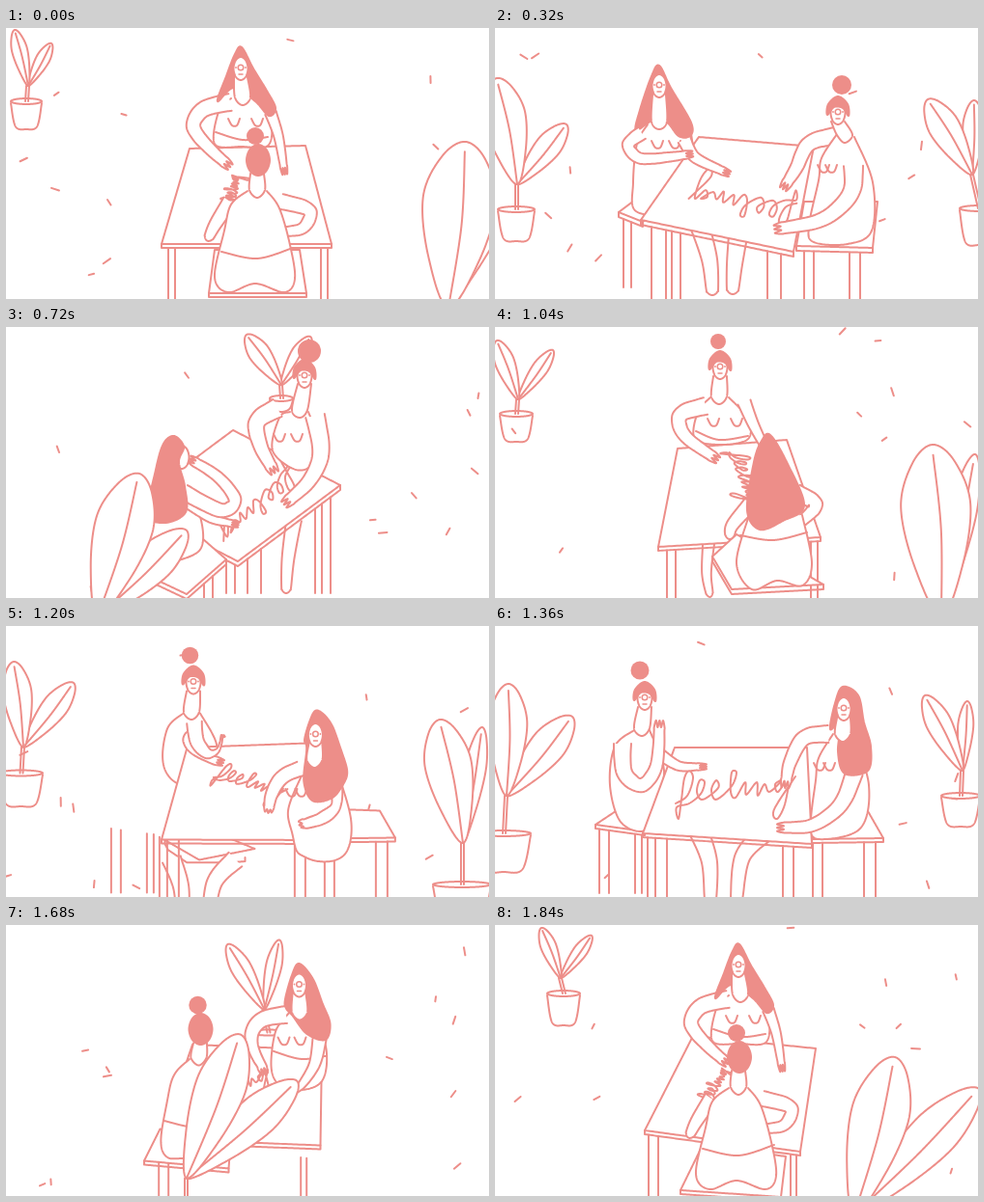
Recreate the animation shown at these times as an HTML page with a canvas. Size 500 px wide and 281 px high, loop 1920 ms.

```html
<!DOCTYPE html>
<html lang="en">
<head>
<meta charset="utf-8">
<title>Feeling</title>
<style>
html, body { margin: 0; width: 100%; height: 100%; overflow: hidden; background: #fff; }
canvas { display: block; width: 500px; height: 281px; }
</style>
</head>
<body>
<canvas id="stage"></canvas>
<script>
const INK = '#ed8e89', STEP = 80, COUNT = 24, SAMPLES = 240, FLOOR = 284;
const lerp = (a, b, u) => a + (b - a) * u;
const poses = [];
let strokes, ox = 0, oy = 0;

// Even samples along a flat list of points
function trace(nums, count, loop, straight) {
  const n = nums.length / 2, spans = loop ? n : n - 1, out = [];
  const at = (i, c) => nums[(loop ? (i + n) % n : Math.min(Math.max(i, 0), n - 1)) * 2 + c];
  for (let k = 0; k <= count; k++) {
    const s = k / count * spans, i = Math.min(Math.floor(s + 1e-9), spans - 1), u = s - i;
    for (const c of [0, 1]) {
      const p = at(i, c), q = at(i + 1, c);
      const m = (q - at(i - 1, c)) / 2, r = (at(i + 2, c) - p) / 2;
      out.push(straight ? lerp(p, q, u)
        : p + u * (m + u * (3 * (q - p) - 2 * m - r + u * (2 * (p - q) + m + r))));
    }
  }
  return out;
}

// Kinds: s curve, w white curve, z white closed curve, f filled closed curve,
// l line, k white polygon, c disc, e face features, d separate segments
function add(name, kind, ...nums) {
  const moved = nums.map((v, i) => i > 1 && kind === 'c' ? v : v + (i % 2 ? oy : ox));
  const path = 'ced'.includes(kind) ? moved
    : trace(moved, SAMPLES, 'zfk'.includes(kind), 'lk'.includes(kind));
  strokes.set(name, { kind, path });
}

function shift(x = 0, y = 0) { ox = x; oy = y; }

function oval(name, kind, x, y, rx, ry) {
  const d = 0.7;
  add(name, kind, x, y - ry, x + rx * d, y - ry * d, x + rx, y, x + rx * d, y + ry * d,
    x, y + ry, x - rx * d, y + ry * d, x - rx, y, x - rx * d, y - ry * d);
}

function leaf(name, x, y, tx, ty, w) {
  const dx = tx - x, dy = ty - y, len = Math.hypot(dx, dy);
  const spot = (t, side) => [x + dx * t - dy / len * w * side, y + dy * t + dx / len * w * side];
  add(name, 'z', x, y, ...spot(.3, .7), ...spot(.65, 1), ...spot(.9, .6), tx, ty,
    ...spot(.9, -.6), ...spot(.65, -1), ...spot(.3, -.7));
  add(name + 'v', 's', ...spot(.94, 0), ...spot(.5, .12), x, y);
}

function plant(name, x, y, a, b, pot = [x, y + 60, 40, 50]) {
  const [px, py, w, h] = pot, q = w * .7;
  add(name + 'Pot', 's', px - w, py + 2, px - q, py + h - 3, px, py + h, px + q, py + h - 3, px + w, py + 2);
  oval(name + 'Rim', 'z', px, py, w, 3);
  add(name + 'Stem', 'd', x - 2, y, px - 1, py, x + 1, y, px + 2, py);
  leaf(name + 'B', x, y, ...b);
  leaf(name + 'A', x, y, ...a);
}

// Tapered arm or leg around a centre line
function limb(name, w, nums, hand = true) {
  const mid = trace(nums, 8), left = [], right = [], tip = [];
  let nx, ny;
  for (let i = 0; i <= 8; i++) {
    const a = Math.max(i - 1, 0) * 2, b = Math.min(i + 1, 8) * 2;
    const dx = mid[b] - mid[a], dy = mid[b + 1] - mid[a + 1], len = Math.hypot(dx, dy);
    const r = w * (1 - i * .05);
    nx = -dy / len; ny = dx / len;
    left.push(mid[i * 2] + nx * r, mid[i * 2 + 1] + ny * r);
    right.unshift(mid[i * 2] - nx * r, mid[i * 2 + 1] - ny * r);
  }
  for (let k = 0; k < 7; k++) {
    const side = 1 - k / 3, r = w * .6 * side;
    const out = hand ? (k % 2 ? 11 : 4) : 4 * (1 - side * side);
    tip.push(mid[16] + nx * r + ny * out, mid[17] + ny * r - nx * out);
  }
  add(name, 'w', ...left, ...tip, ...right);
}

function table(name, top, thick, xs = [], end = FLOOR, corner = false) {
  const front = top.slice(2, corner ? 8 : 6), n = front.length, legs = [];
  const edgeY = x => {
    const i = n > 4 && x > front[2] ? 2 : 0;
    return lerp(front[i + 1], front[i + 3], (x - front[i]) / (front[i + 2] - front[i]));
  };
  for (const x of xs) legs.push(x, edgeY(x) + thick, x, end);
  if (xs.length) add(name + 'Legs', 'd', ...legs);
  const low = front.map((v, i) => v + (i % 2 ? thick : 0));
  add(name + 'Edge', 'l', front[0], front[1], ...low, front[n - 2], front[n - 1]);
  add(name + 'Top', 'k', ...top);
}

function face(name, x, y, look = true) {
  oval(name + 'Face', 'z', x, y, 7.5, 12);
  if (look) add(name + 'Eyes', 'e', x, y - 1);
}

function neck(name, x, y, bx, by) {
  add(name + 'Neck', 'w', x - 7, y + 9, bx - 8, by, bx, by + 8, bx + 8, by, x + 7, y + 9);
}

function bust(name, x, y, gap) {
  for (const side of [-1, 1]) {
    const c = x + side * gap;
    add(name + 'Bust' + side, 's', c - 6, y - 5, c - 2, y + 2, c + 3, y + 2, c + 6, y - 5);
  }
}

function cap(x, y, bx, by, r) {
  face('b', x, y);
  add('bCap', 'f', x - 11, y + 2, x - 10, y - 9, x, y - 17, x + 10, y - 9, x + 11, y + 3, x + 5, y - 5, x - 4, y - 6);
  add('bBun', 'c', bx, by, r);
}

const body = (name, ...nums) => add(name + 'Body', 'w', ...nums);
const hair = (...nums) => add('aHair', 'f', ...nums);

const letters = [0, 4, 12, -4, 18, -22, 14, -30, 9, -22, 6, 0, 3, 20, 1, 8, 14, 4, 26, -6, 30, -18, 25, -20,
  22, -8, 28, 0, 44, -12, 42, -20, 37, -10, 42, 0, 58, -14, 63, -28, 58, -28, 57, -8, 62, -2, 72, -18,
  73, -5, 84, -18, 85, -4, 92, -16, 97, -8, 110, -20, 103, -16, 106, -8, 117, -22, 113, 5, 105, 20, 102, 10, 124, -24];

// Lettering set along one axis, with its height along another
function word(x, y, ax, ay, bx, by) {
  const out = [];
  for (let i = 0; i < letters.length; i += 2) {
    const u = letters[i], v = letters[i + 1];
    out.push(x + u * ax + v * bx, y + u * ay + v * by);
  }
  add('word', 's', ...out);
}

function facing(x, y) {
  shift(x, y);
  body('a', 233, 73, 221, 84, 216, 120, 244, 123, 272, 121, 273, 90, 255, 72);
  add('aHem', 's', 217, 108, 245, 116, 271, 113);
  bust('a', 248, 99, 12);
  limb('aL', 9, [232, 77, 205, 84, 194, 102, 208, 122, 224, 137]);
  limb('aR', 6, [274, 88, 282, 112, 287, 141]);
  hair(244, 20, 256, 42, 270, 65, 279, 83, 272, 91, 258, 76, 236, 62, 219, 76, 228, 50, 237, 27);
  neck('a', 243, 42, 245, 72);
  face('a', 243, 42);
  shift();
}

function seated(x, y) {
  shift(x, y);
  limb('bL', 8, [232, 180, 217, 203, 210, 217], false);
  limb('bR', 8, [285, 180, 314, 189, 308, 207, 290, 211], false);
  body('b', 250, 169, 233, 183, 226, 210, 216, 258, 230, 274, 258, 265, 288, 274, 299, 260, 294, 225, 283, 187, 270, 169);
  add('bHem', 's', 223, 232, 260, 239, 297, 228);
  neck('b', 260, 142, 260, 168);
  oval('bHead', 'f', 261, 137, 12, 16);
  add('bBun', 'c', 258, 112, 9);
  shift();
}

function leaning(x, y) {
  shift(x, y);
  body('a', 350, 112, 335, 137, 332, 160, 327, 205, 335, 221, 378, 210, 387, 165, 370, 112);
  bust('a', 341, 147, 5);
  limb('aL', 9, [345, 112, 320, 116, 306, 140, 302, 157]);
  limb('aR', 9, [372, 152, 358, 185, 330, 206, 303, 209]);
  hair(360, 63, 376, 72, 382, 100, 389, 125, 386, 150, 362, 153, 355, 130, 358, 100, 347, 107, 352, 80);
  neck('a', 361, 86, 360, 112);
  face('a', 361, 86);
  shift();
}

function pose(at, build) {
  strokes = new Map();
  build();
  poses.push({ at, strokes });
}

pose(0, () => {
  plant('p', 23, 60, [9, 2, 8], [47, 16, 7], [21, 76, 16, 29]);
  plant('q', 458, 290, [476, 118, 38], [525, 150, 14]);
  table('t', [190, 125, 161, 224, 337, 224, 310, 122], 4, [168, 175, 326, 333]);
  facing(0, 0);
  word(236, 180, .08, -.22, .5, 0);
  table('s', [216, 230, 210, 275, 311, 275, 304, 230], 4);
  seated(0, 0);
});

pose(4, () => {
  plant('p', 23, 162, [2, 52, 22], [74, 100, 13], [22, 188, 19, 33]);
  plant('q', 494, 152, [448, 74, 16], [496, 75, 11], [501, 187, 20, 38]);
  table('s', [144, 179, 128, 191, 153, 201, 170, 185], 5, [133, 141], 269);
  table('u', [320, 180, 312, 226, 391, 228, 396, 180], 5, [320, 330, 367, 378]);
  body('a', 158, 100, 147, 120, 143, 160, 146, 190, 185, 190, 205, 150, 203, 108);
  limb('bFoot', 10, [212, 205, 222, 240, 225, 273], false);
  limb('bToe', 10, [252, 212, 248, 245, 246, 272], false);
  table('t', [211, 113, 151, 199, 309, 232, 330, 123], 5, [162, 177, 183, 192, 282, 296]);
  word(312, 185, -.88, -.22, .1, -.8);
  bust('a', 177, 122, 9);
  hair(170, 39, 182, 62, 203, 98, 202, 112, 190, 112, 178, 98, 163, 96, 146, 106, 150, 85, 162, 50);
  limb('aR', 7, [196, 116, 207, 134, 233, 147]);
  limb('aL', 7, [152, 109, 138, 121, 150, 135, 178, 134, 194, 132]);
  neck('a', 170, 60, 170, 97);
  face('a', 170, 60);
  limb('bL', 9, [352, 112, 325, 120, 312, 145, 304, 158]);
  body('b', 354, 110, 338, 135, 335, 158, 325, 205, 330, 222, 365, 224, 390, 210, 391, 160, 372, 113);
  bust('b', 344, 147, 4);
  limb('bR', 10, [371, 143, 368, 172, 340, 198, 300, 207]);
  neck('b', 355, 88, 362, 111);
  cap(355, 88, 359, 59, 10);
});

pose(9, () => {
  plant('q', 285, 60, [249, 8, 11], [315, 10, 9], [285, 74, 12, 14]);
  limb('bFoot', 8, [298, 200, 292, 240, 290, 272], false);
  table('t', [235, 107, 129, 186, 240, 243, 346, 164], 5, [228, 237, 250, 264, 320, 327, 336], 276, true);
  word(295, 148, -.64, .5, -.4, -.5);
  body('b', 294, 88, 283, 94, 276, 128, 300, 148, 318, 140, 318, 105, 313, 88);
  bust('b', 292, 116, 9);
  limb('bL', 10, [281, 84, 260, 98, 263, 122, 273, 142]);
  limb('bR', 10, [320, 92, 326, 130, 315, 158, 296, 177]);
  neck('b', 309, 50, 304, 86);
  cap(309, 51, 314, 25, 12);
  table('s', [187, 205, 130, 250, 187, 277, 228, 241], 5, [205, 214], FLOOR, true);
  body('a', 150, 195, 143, 215, 145, 245, 200, 232, 198, 187, 180, 180);
  limb('aR', 6, [188, 182, 212, 198, 230, 203]);
  limb('aL', 8, [184, 171, 222, 190, 237, 179, 220, 156, 199, 142]);
  face('a', 182, 135, false);
  hair(174, 113, 184, 124, 179, 140, 185, 165, 186, 192, 165, 203, 147, 194, 155, 148, 163, 121);
  plant('p', 95, 300, [138, 152, 30], [187, 211, 20]);
});

pose(13, () => {
  plant('q', 24, 75, [2, 14, 10], [60, 24, 8], [22, 90, 17, 29]);
  plant('p', 462, 300, [453, 122, 36], [497, 132, 14]);
  limb('bFoot', 6, [221, 225, 219, 255, 222, 276], false);
  table('t', [189, 126, 169, 228, 337, 218, 302, 117], 4, [178, 187, 327, 334]);
  word(245, 130, .1, .42, -.6, 0);
  body('b', 223, 73, 210, 88, 207, 116, 235, 122, 262, 116, 262, 95, 242, 73);
  add('bHem', 's', 208, 108, 232, 117, 262, 113);
  bust('b', 238, 100, 12);
  limb('bL', 9, [218, 82, 192, 91, 196, 112, 222, 132]);
  limb('bR', 7, [258, 78, 267, 100, 277, 120]);
  neck('b', 233, 42, 232, 72);
  cap(233, 42, 231, 15, 8);
  table('s', [250, 215, 225, 238, 245, 272, 340, 267], 5, [], FLOOR, true);
  limb('aL', 8, [264, 184, 246, 205, 243, 216], false);
  limb('aR', 9, [312, 172, 332, 184, 318, 201], false);
  body('a', 262, 198, 250, 245, 266, 272, 292, 263, 318, 268, 328, 245, 318, 195);
  add('aHem', 's', 254, 216, 288, 221, 323, 213);
  hair(285, 112, 302, 140, 320, 185, 298, 201, 274, 210, 261, 190, 268, 140, 276, 118);
});

pose(17, () => {
  plant('q', 12, 176, [14, 60, 20], [80, 94, 18], [9, 215, 28, 40]);
  plant('p', 484, 150, [445, 72, 13], [489, 78, 8], [482, 176, 20, 32]);
  table('s', [128, 190, 104, 206, 155, 213, 175, 195], 4, [108, 118, 145, 152], 277);
  table('u', [330, 190, 328, 221, 402, 220, 386, 192], 4, [329, 339, 382, 394]);
  limb('aFoot', 10, [212, 215, 222, 245, 223, 284], false);
  limb('aToe', 10, [278, 215, 256, 240, 250, 284], false);
  body('b', 144, 108, 124, 125, 119, 165, 130, 203, 155, 212, 165, 185, 175, 150, 160, 108);
  table('t', [186, 126, 153, 215, 328, 226, 323, 126], 4, [158, 166, 178, 298, 309]);
  word(187, 180, 1, 0, 0, 1);
  limb('bL', 6, [172, 134, 190, 145, 208, 146]);
  limb('bR', 9, [132, 122, 134, 152, 152, 165, 167, 145, 170, 109]);
  neck('b', 155, 75, 152, 106);
  cap(155, 75, 150, 46, 9.5);
  leaning(0, 0);
});

pose(19, () => {
  plant('q', 2, 225, [71, 90, 22], [102, 154, 18], [0, 253, 27, 32]);
  plant('p', 467, 120, [411, 37, 13], [466, 20, 10], [472, 152, 22, 30]);
  table('s', [104, 195, 94, 214, 165, 223, 165, 200], 4, [102, 114, 145, 157]);
  table('u', [335, 190, 335, 220, 405, 217, 384, 188], 4, [344, 386, 398]);
  limb('aFoot', 10, [220, 215, 226, 250, 228, 284], false);
  limb('aToe', 10, [275, 215, 258, 245, 255, 284], false);
  body('b', 138, 109, 120, 135, 113, 185, 117, 212, 165, 218, 170, 187, 178, 150, 155, 108);
  table('t', [181, 133, 164, 231, 335, 222, 322, 131], 4, [180, 191, 309, 313, 325]);
  word(187, 181, .97, -.04, 0, 1);
  limb('bL', 6, [178, 150, 190, 151, 197, 151]);
  limb('bR', 9, [130, 135, 138, 158, 160, 162, 173, 137, 162, 99]);
  neck('b', 150, 85, 147, 107);
  cap(150, 85, 147, 54, 9.5);
  leaning(-6, -3);
});

pose(23, () => {
  plant('p', 68, 55, [48, 3, 8], [100, 11, 7], [71, 71, 17, 33]);
  table('t', [205, 115, 155, 213, 316, 235, 332, 128], 4, [159, 169, 306, 312]);
  facing(9, 0);
  word(222, 182, .2, -.25, .5, .1);
  table('s', [215, 228, 192, 275, 296, 282, 301, 240], 4);
  seated(-8, 0);
  plant('q', 372, 300, [414, 137, 30], [501, 170, 24]);
});

poses.push({ at: COUNT, strokes: poses[0].strokes });

const anchors = { a: 'aHair', b: 'bBun', p: 'pA', q: 'qA' };

function centre({ kind, path }) {
  if (kind === 'c') return path;
  const sum = [0, 0];
  path.forEach((v, i) => { sum[i % 2] += v; });
  return sum.map(v => v * 2 / path.length);
}

const canvas = document.getElementById('stage'), ctx = canvas.getContext('2d');
const scale = window.devicePixelRatio || 1;
canvas.width = 500 * scale;
canvas.height = 281 * scale;

function disc(x, y, r) {
  ctx.beginPath();
  ctx.arc(x, y, r, 0, Math.PI * 2);
}

function features(x, y) {
  ctx.lineWidth = 1.5;
  disc(x, y, 2.8);
  ctx.stroke();
  for (const side of [-5, 5]) { disc(x + side, y, 0.9); ctx.fill(); }
  ctx.beginPath();
  ctx.moveTo(x - 2, y + 7);
  ctx.lineTo(x + 2, y + 7);
  ctx.stroke();
}

function paint(kind, p) {
  ctx.fillStyle = ctx.strokeStyle = INK;
  ctx.lineWidth = 2;
  if (kind === 'e') return features(p[0], p[1]);
  if (kind === 'c') { disc(...p); return ctx.fill(); }
  ctx.beginPath();
  for (let i = 0; i < p.length; i += 2) {
    const start = i === 0 || (kind === 'd' && i % 4 === 0);
    ctx[start ? 'moveTo' : 'lineTo'](p[i], p[i + 1]);
  }
  if ('wzk'.includes(kind)) ctx.fillStyle = '#fff';
  if ('wzkf'.includes(kind)) ctx.fill();
  ctx.stroke();
}

// Loose dashes around the table
function scatter(seed) {
  const rand = () => (seed = seed * 16807 % 2147483647) / 2147483647;
  const out = [];
  for (let i = 0; i < 11; i++) {
    let x = rand() * 490;
    const y = rand() * 270;
    if (x > 140 && x < 400 && y > 50) x += x < 270 ? -135 : 95;
    const turn = rand() * Math.PI, len = 5 + rand() * 4;
    out.push(x, y, x + Math.cos(turn) * len, y + Math.sin(turn) * len);
  }
  return out;
}

function draw(step) {
  const i = poses.findIndex(p => p.at > step) - 1;
  const from = poses[i], to = poses[i + 1];
  const u = (step - from.at) / (to.at - from.at);
  const near = u < 0.5 ? from : to, far = u < 0.5 ? to : from;
  const w = Math.min(u, 1 - u);
  ctx.setTransform(scale, 0, 0, scale, 0, 0);
  ctx.fillStyle = '#fff';
  ctx.fillRect(0, 0, 500, 281);
  ctx.lineCap = ctx.lineJoin = 'round';
  paint('d', scatter(7919 * (step + 3)));
  for (const [name, s] of near.strokes) {
    const other = far.strokes.get(name);
    let path = s.path;
    if (other && other.path.length === path.length) {
      path = path.map((v, k) => lerp(v, other.path[k], w));
    } else {
      // Parts without a partner follow their group
      const key = anchors[name[0]] || 'tTop';
      const a = centre(near.strokes.get(key)), b = centre(far.strokes.get(key));
      path = path.map((v, k) => k > 1 && s.kind === 'c' ? v : v + (b[k % 2] - a[k % 2]) * w);
    }
    paint(s.kind, path);
  }
}

let last = -1;
function tick() {
  const step = Math.floor(performance.now() / STEP) % COUNT;
  if (step !== last) draw(last = step);
  requestAnimationFrame(tick);
}
tick();
</script>
</body>
</html>
```
